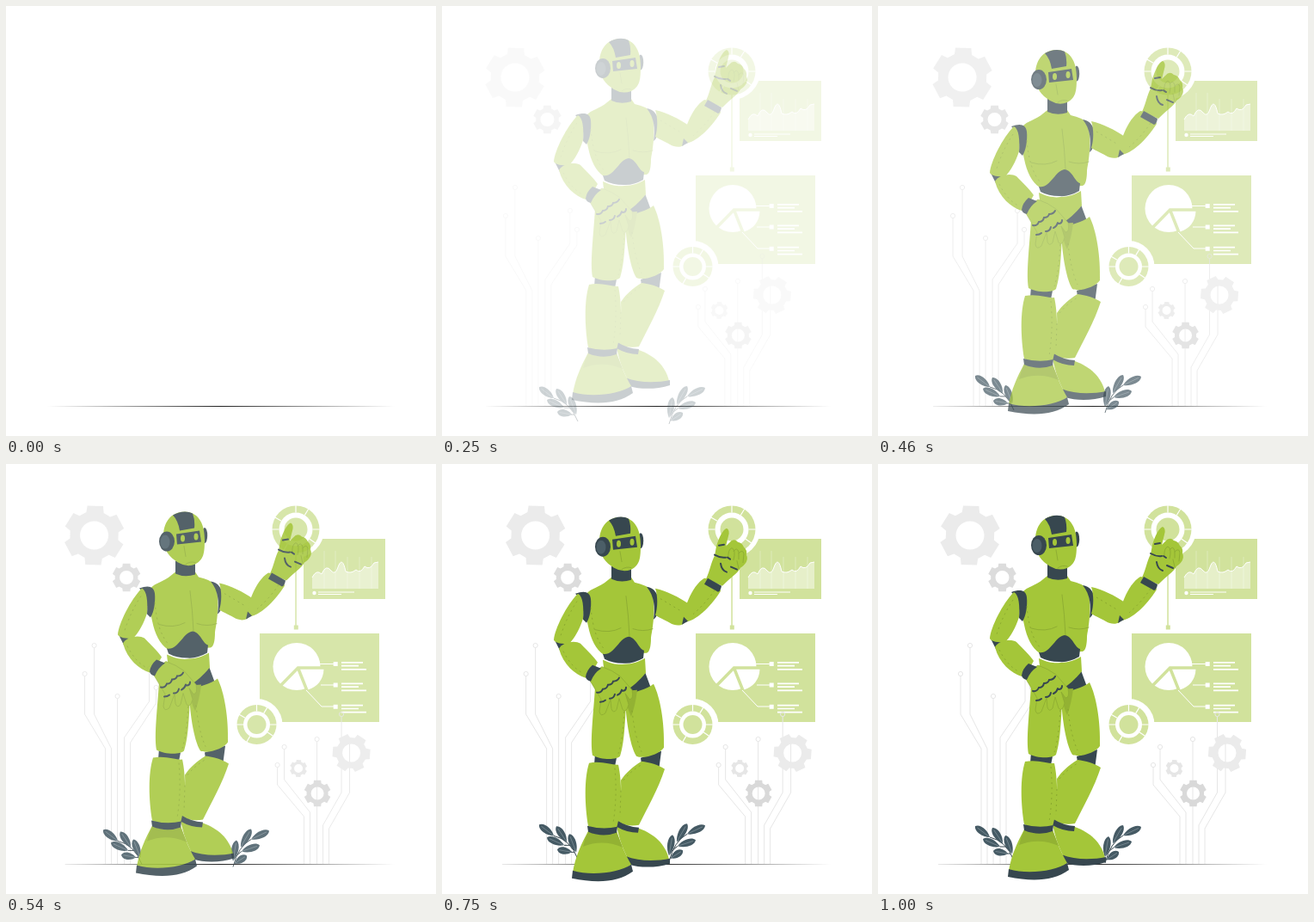
An HTML page for the animation above (1.04 s loop, 500 by 500 pixels).

```html
<!DOCTYPE html>
<html lang="en">
<head>
<meta charset="utf-8">
<title>Robot and charts</title>
<style>
html, body { margin: 0; width: 100%; height: 100%; overflow: hidden; background: #fff; }
svg { display: block; width: 100%; height: 100%; }
.g { fill: #a4c639; }
.d { fill: #37474f; }
.pale { fill: #d1e29c; }
.w { fill: #fff; }
.line { fill: none; stroke: #8aa832; stroke-width: .8; stroke-linecap: round; }
.seam { fill: none; stroke: #83a02d; stroke-width: .8; stroke-dasharray: 2 4; }
.joint { fill: none; stroke: #37474f; stroke-width: 2; stroke-linecap: round; }
.wl { fill: none; stroke: #fff; }
#wires { fill: none; stroke: #e6e6e6; stroke-width: 1; }
</style>
</head>
<body>
<svg viewBox="0 0 500 500">
  <defs>
    <linearGradient id="fade" gradientUnits="userSpaceOnUse" x1="48" x2="452" y1="0" y2="0">
      <stop offset="0" stop-color="#222" stop-opacity="0"/>
      <stop offset=".5" stop-color="#222"/>
      <stop offset="1" stop-color="#222" stop-opacity="0"/>
    </linearGradient>
  </defs>
  <rect id="floor" y="465" height="1" fill="url(#fade)"/>

  <g id="panels">
    <path class="pale" d="M346 87h95v70h-95zM295 197h139v103h-139z"/>
    <path class="wl" stroke-width=".5" opacity=".6" d="M370 101v44M383 101v44M397 108v37M411 108v37M425 108v37"/>
    <path class="w" opacity=".45" d="M356 145V132Q361 122 367 128Q372 116 378 124Q383 130 386 120Q391 106 395 125Q401 128 407 123Q412 128 417 119Q423 124 428 115L433 114V145z"/>
    <path class="wl" d="M356 132Q361 122 367 128Q372 116 378 124Q383 130 386 120Q391 106 395 125Q401 128 407 123Q412 128 417 119Q423 124 428 115L433 114"/>
    <circle class="w" cx="358.500" cy="150" r="2.200"/>
    <path class="wl" stroke-width="1.200" d="M363 149h42M363 151.500h27"/>

    <circle class="w" cx="338" cy="235.500" r="27.500"/>
    <path class="w" d="M342 238H369.500Q369 257 350 263z"/>
    <path fill="none" stroke="#d1e29c" stroke-width="3.500" d="M370 237H339.500L317 260M339.500 237L351 266"/>
    <path class="wl" d="M364 232.500h19M366 257h17M349 263L367 282H383"/>
    <g id="rows"></g>

    <circle class="w" cx="337" cy="76" r="33"/>
    <circle class="w" cx="291.500" cy="303" r="30"/>
    <g id="dials"></g>
    <path class="pale" d="M336.300 103h1.500v84.500h2v5h-5v-5h1.500z"/>
  </g>

  <g id="back">
    <g id="wires"></g>
    <g id="gears" fill-rule="evenodd"></g>
  </g>

  <g id="plants"></g>

  <g id="robot">
    <!-- legs -->
    <path class="d" d="M178 335L203 340L201 350L177 348zM231 340L255 332L252 355L232 347zM214 262L236 240L243 259L216 268z"/>
    <path class="g" d="M178 258C176 290 172 320 175 337C184 342 202 343 207 338C213 320 213 290 215 258z"/>
    <path class="g" d="M213 266C224 264 238 260 246 254C254 270 259 300 258 328C254 335 235 342 226 338C218 325 213 290 213 266z"/>
    <path fill="#93b233" d="M213 262L227 261Q225 278 220 292Q214 280 213 262z"/>
    <path class="g" d="M203 418L229 422C246 428 260 440 264 458C250 462 230 462 217 459C211 447 206 436 203 418z"/>
    <path class="g" d="M232 344C241 345 252 348 259 353C252 375 238 400 229 418C220 420 210 418 203 414C206 400 209 385 208 366C214 357 222 350 232 344z"/>
    <path class="d" d="M204 413Q215 420 229 421L228 427Q215 427 203 420zM213 454C230 461 250 460 265 457V463C250 468 230 468 218 464z"/>
    <path class="g" d="M171 346C185 343 199 349 205 348C209 365 210 400 203 421C193 424 178 424 170 419C166 395 165 365 171 346z"/>
    <path class="g" d="M170 425C180 431 195 431 203 425C208 440 214 454 220 464C208 474 180 478 152 473C155 455 162 440 170 425z"/>
    <path fill="#93b233" d="M170 426Q187 432 203 426L210 444Q187 434 164 443Q166 434 170 426z"/>
    <path class="d" d="M169 419Q187 424 204 420L203 427Q187 433 170 426zM152 471C175 478 206 473 220 464L222 472C204 485 180 486 151 480z"/>
    <path class="seam" d="M212 280Q211 315 205 335M221 285Q224 315 232 333M201 352Q204 385 199 416M211 366Q220 355 232 348M208 378L207 408"/>

    <!-- trunk -->
    <path class="g" d="M187 226C198 231 206 232 212 231C222 231 229 228 236 224L237 241C230 250 220 258 214 262C205 268 190 260 187 226z"/>
    <path class="g" d="M192 134C184 141 173 143 168 149C170 162 167 176 170 187C173 202 179 214 188 220L238 218Q243 216 243 200C246 185 249 160 243 145Q238 139 224 136L220 130H197z"/>
    <path class="d" d="M187 219C200 222 206 200 217 199C226 200 229 214 235 215L234 224Q222 231 211 230Q198 230 189 225z"/>
    <path class="d" d="M197 117L220 118V133Q208 137 197 132z"/>
    <path class="d" d="M155 149C166 145 172 147 173 155C174 165 172 177 168 183L164 179C165 166 163 156 155 149zM238 141C247 142 252 150 252 160C252 170 250 176 246 179C248 165 247 152 238 141z"/>
    <path class="line" d="M214 152Q217 175 218 199M178 191Q195 196 208 189M222 190Q234 194 245 190"/>
    <path class="seam" d="M173 165Q176 200 189 214"/>

    <!-- arm on the hip -->
    <path class="d" d="M131 203L146 207L137 215z"/>
    <path class="g" d="M158 149C164 152 165 165 164 178C160 190 155 200 147 208C140 207 132 207 130 203C131 190 145 162 158 149z"/>
    <path class="g" d="M136 213C140 205 155 203 161 207C168 214 176 222 181 229C177 237 172 242 167 247C155 243 141 232 136 213z"/>
    <path class="g" stroke="#8aa832" stroke-width=".7" d="M172 250Q176 240 186 234Q198 238 207 245L221 261Q223 272 218 272L213 265L217 278Q214 289 210 284L206 271L203 284Q199 289 197 283L196 272L190 288Q184 293 183 286L185 272Q178 260 172 250z"/>
    <path class="d" d="M167 246Q168 238 175 232L185 236Q177 241 173 251Q168 250 167 246z"/>
    <path class="joint" d="M180 264q5 1 7 -4q5 0 6 -5q5 0 6 -4q5 0 7 -4M184 275q4 0 6 -2M195 271q5 0 6 -5M204 267q4 -2 5 -6M210 262q4 0 4 -4"/>
    <path class="seam" d="M157 158Q145 176 138 198M141 216Q150 234 163 241"/>

    <!-- raised arm -->
    <path class="g" d="M248 143C262 146 275 153 287 161L281 184C276 187 270 186 265 183C258 179 251 176 248 174C251 165 251 152 248 143z"/>
    <path class="g" d="M305 131C312 132 322 138 324 146C312 165 295 181 282 182C278 172 290 140 305 131z"/>
    <path class="d" d="M281 176L286 181L279 185z"/>
    <path class="g" d="M307 132C312 121 313 112 317 105L319 94C322 84 326 75 331 73Q335 75 333 82L330 94L334 90Q339 84 344 89Q349 90 351 95Q355 98 354 104C357 110 352 116 347 119C344 125 336 130 326 140z"/>
    <path class="d" d="M309 131L325 140Q324 146 321 147L305 138z"/>
    <path class="line" d="M333 108q-1 -10 4 -12q5 2 2 14M339 100q4 -6 6 1v8M345 102q5 -5 6 1l-1 10M343 111l2 9"/>
    <path class="joint" d="M317 104q7 4 13 3M322 93l6 -1M324 114q1 8 7 10M336 118l7 3M332 107l3 2"/>
    <path class="seam" d="M254 155L279 170M317 145Q307 160 292 173"/>

    <!-- head -->
    <ellipse class="d" cx="231" cy="87.500" rx="3.200" ry="9"/>
    <path class="g" d="M183 92C182 72 192 60 208 60C222 60 231 72 231 92C231 108 230 116 220 121Q210 125 200 119C190 113 183 104 183 92z"/>
    <path class="d" d="M194 64C200 60 210 58 217 62Q220 70 219 79L202 82Q200 70 194 64zM198 86L225 82L227 95L199 98z"/>
    <ellipse class="g" cx="205.500" cy="91" rx="2.500" ry="4"/>
    <ellipse class="g" cx="221" cy="89" rx="2.500" ry="4"/>
    <path class="line" d="M207 100L209 112M209 121Q214 117 220 119"/>
    <ellipse class="d" cx="187" cy="94.500" rx="9" ry="11.500"/>
    <ellipse cx="185" cy="95" rx="5.500" ry="8" fill="#4b5e67"/>
  </g>
</svg>
<script>
const el = id => document.getElementById(id);
const add = (id, markup) => el(id).insertAdjacentHTML('beforeend', markup);
const polar = (x, y, r, deg) => {
  const a = deg * Math.PI / 180;
  return (x + r * Math.cos(a)).toFixed(1) + ' ' + (y + r * Math.sin(a)).toFixed(1);
};

function gear(x, y, r, hole, turn, color) {
  const corners = [];
  for (let i = 0; i < 6; i++) {
    const a = i * 60 + turn;
    corners.push(polar(x, y, r * .8, a - 21), polar(x, y, r, a - 15),
      polar(x, y, r, a + 15), polar(x, y, r * .8, a + 21));
  }
  add('gears', `<path fill="${color}" d="M${corners.join('L')}zM${x - hole} ${y}` +
    `a${hole} ${hole} 0 1 0 ${hole * 2} 0a${hole} ${hole} 0 1 0 ${-hole * 2} 0z"/>`);
}
gear(107, 83, 35.5, 16.5, 32, '#ebebeb');
gear(144.5, 132, 16.8, 8, 30, '#dcdcdc');
gear(406, 336, 22.5, 10.5, 4, '#ebebeb');
gear(344.5, 354, 10.3, 5, 32, '#e6e6e6');
gear(366.5, 383, 15.8, 7.5, 30, '#d9d9d9');

// Node, height of the two bends, foot of the wire
const wires = [
  [96, 244, 291, 331, 120], [107, 211, 291, 331, 127], [134, 270, 300, 331, 134],
  [171, 238, 276, 318, 142], [179, 260, 278, 324, 149],
  [320, 350, 373, 410, 351], [328, 329, 367, 405, 358], [366, 320, 367, 405, 366],
  [394.5, 291, 382, 420, 373], [404, 322, 382, 424, 380]
];
for (const [x, y, top, low, foot] of wires)
  add('wires', `<circle cx="${x}" cy="${y}" r="2.6"/><path d="M${x} ${y + 2.6}V${top}L${foot} ${low}V465"/>`);

for (const y of [232.5, 257, 282.3])
  add('rows', `<path class="w" d="M380.7 ${y - 2.5}h5v5h-5z"/>` +
    `<path class="wl" stroke-width="1.7" d="M390 ${y - 1.7}h25M390 ${y + 2.2}h20M390 ${y + 6.3}h29"/>`);

function dial(x, y, r, gap, core) {
  const ticks = [-180, -150, -90, -58, 0, 35, 120]
    .map(a => `M${polar(x, y, gap, a)}L${polar(x, y, r + 1, a)}`).join('');
  add('dials', `<circle class="pale" cx="${x}" cy="${y}" r="${r}"/><circle class="w" cx="${x}" cy="${y}" r="${gap}"/>` +
    `<circle class="pale" cx="${x}" cy="${y}" r="${core}"/><path class="wl" stroke-width="1.2" d="${ticks}"/>`);
}
dial(337, 76, 27.5, 19.5, 13.5);
dial(291.5, 303, 23, 15.5, 11);

// Each leaf runs from its base to its tip
function plant(stem, leaves) {
  add('plants', `<path d="${stem}" fill="none" stroke="#37474f"/>`);
  for (const [x, y, tipX, tipY] of leaves) {
    const size = Math.hypot(tipX - x, tipY - y);
    const turn = Math.atan2(tipY - y, tipX - x) * 180 / Math.PI;
    add('plants', `<g transform="translate(${x} ${y}) rotate(${turn})">` +
      `<path d="M0 0C${size * .3} -5 ${size * .85} -6 ${size} 0C${size * .85} 6 ${size * .3} 5 0 0" fill="#455a64"/>` +
      `<path d="M1 0H${size * .85}" stroke="#8a9aa2" stroke-width=".6"/></g>`);
  }
}
plant('M158 461Q149 438 130 434M154 453L150 453M149 445L142 445', [
  [130, 434, 113, 421], [145, 441, 133, 423], [142, 445, 122, 436], [151, 453, 134, 450], [156, 453, 148, 432]
]);
plant('M264 464Q270 440 285 432M266 460L268 459M269 450L274 446', [
  [285, 432, 306, 422], [273, 441, 285, 420], [274, 446, 295, 439], [266, 460, 280, 451], [264, 457, 268, 433]
]);

// cubic-bezier(.36, -.01, .5, 1.38)
function ease(time) {
  const curve = (a, b, s) => 3 * a * s * (1 - s) ** 2 + 3 * b * s * s * (1 - s) + s ** 3;
  let low = 0, high = 1;
  for (let i = 0; i < 24; i++) {
    const mid = (low + high) / 2;
    if (curve(.36, .5, mid) < time) low = mid; else high = mid;
  }
  return curve(-.01, 1.38, low);
}

function draw(now) {
  // 24 steps per second, blank for the first three
  const step = Math.floor((now % 1040 + 5) * .024);
  const p = step < 3 ? 0 : ease(Math.min(1, step / 24 + .02));
  const away = 30 * (1 - p);
  for (const id of ['panels', 'back', 'plants', 'robot'])
    el(id).setAttribute('opacity', Math.min(1, p));
  el('back').setAttribute('transform', `translate(${-away} 0)`);
  el('plants').setAttribute('transform', `translate(0 ${away})`);
  el('robot').setAttribute('transform', `translate(0 ${-away})`);
  const left = Math.max(48, Math.min(70, 73 - away));
  el('floor').setAttribute('x', left);
  el('floor').setAttribute('width', 452 - left);
  requestAnimationFrame(draw);
}
draw(0);
</script>
</body>
</html>
```
